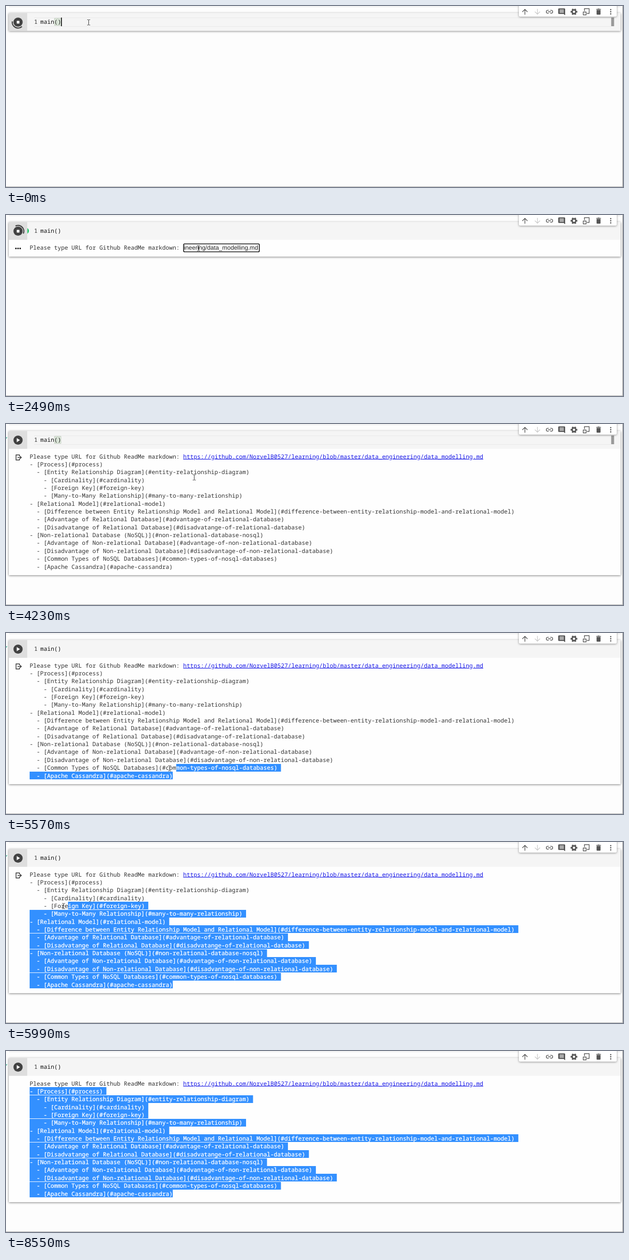
Recreate the animation shown at these times as an HTML page. Size 1280 px wide and 376 px high, loop 8700 ms.

```html
<!DOCTYPE html>
<html lang="en">
<head>
<meta charset="utf-8">
<title>Notebook cell</title>
<style>
  html, body { margin: 0; width: 100%; height: 100%; overflow: hidden; background: #fdfdfd; }
  svg { display: block; width: 1280px; height: 376px; }
  text { font: 12.07px "Noto Sans Mono", monospace; fill: #333; text-rendering: geometricPrecision; }
  .code { fill: #111; }
  .link { fill: #1a1ae6; text-decoration: underline; }
  .typed { font: 12.53px "Liberation Sans", Arial, sans-serif; fill: #222; text-anchor: end; }
  #picked text { fill: #fff; stroke: #fff; stroke-width: .3px; }
  #picked rect { fill: #3390ff; }
  .cell { fill: #fefefe; filter: drop-shadow(0 1.5px 2px rgba(0, 0, 0, .5)); }
  .bar { fill: #fff; filter: drop-shadow(0 1px 2px rgba(0, 0, 0, .4)); }
  .icons { fill: #555; }
  .line { fill: none; stroke: #555; stroke-width: 1.4px; }
</style>
</head>
<body>
<svg viewBox="0 0 1280 376">
  <rect x="6" width="1269" height="3" fill="#f4f4f4"/>
  <rect id="cell" class="cell" x="6" y="14.5" width="1269"/>
  <rect x="6" y="14.5" width="1269" height="37" fill="#f5f5f5"/>
  <rect x="6" y="14.5" width="38" height="37" fill="#dedede"/>

  <g id="editor">
    <path d="M58 24.5H1255M58 42.5H1255" stroke="#e9e9e9"/>
    <rect x="1255.5" y="24" width="6" height="18" fill="#999"/>
    <path d="M100.5 25.5H114V40.5H100.5ZM107.3 25.5V40.5" fill="#e1ecdf" stroke="#c3cdc1"/>
  </g>
  <text x="58.3" y="37.3">1</text>
  <text class="code" x="71" y="37.3">main()</text>
  <rect id="caret" x="114.3" y="24" width="1.6" height="18"/>

  <circle cx="25" cy="33.5" r="9.6" fill="#424242"/>
  <g id="stop">
    <rect x="22.3" y="30.8" width="5.6" height="5.6" rx=".6" fill="#fff"/>
    <path id="spin" d="M13.7 37.8A12 12 0 0 0 36.3 37.8" fill="none" stroke="#424242" stroke-width="2.4"/>
  </g>
  <path id="play" d="M22.3 29.3V37.7L29 33.5Z" fill="#fff"/>
  <path id="busy" d="M44.5 27Q50.5 33 44.5 39Z" fill="#0fbf5a"/>
  <path id="check" d="M0 30L2 27.5" stroke="#2fae8e" stroke-width="1.4"/>

  <path id="dots" d="M20.6 69.5h0M25 69.5h0M29.4 69.5h0" stroke="#222" stroke-width="3.4" stroke-linecap="round"/>
  <path id="out" d="M28 67V64.2H20.8V74.8H28V72M24 69.5H31.5M29 66.7L31.8 69.5 29 72.3" fill="none" stroke="#333" stroke-width="1.5"/>

  <text id="ask" x="49">Please type URL for Github ReadMe markdown:</text>
  <g id="field">
    <rect x="368.5" y="60" width="157" height="16.5" rx="2" fill="#fff" stroke="#111" stroke-width="1.7"/>
    <svg x="370" y="60" width="154" height="16"><text id="typed" class="typed" x="153" y="12">data_engineering/data_modelling.md</text></svg>
  </g>
  <text id="link" class="link" x="367.6" y="71.6">https://github.com/NorvelB0527/learning/blob/master/data_engineering/data_modelling.md</text>
  <g id="list"></g>
  <g id="picked"></g>

  <rect class="bar" x="1064" y="-4" width="203" height="26" rx="3"/>
  <g class="icons">
    <path class="line" d="M1076.5 18V7M1071.2 12.2L1076.5 7 1081.8 12.2"/>
    <path class="line" d="M1102.5 6V17M1097.2 11.8L1102.5 17 1107.8 11.8" style="stroke:#ccc"/>
    <path class="line" d="M1126 8.9H1124A3.1 3.1 0 0 0 1124 15.1H1126M1129 8.9H1131A3.1 3.1 0 0 1 1131 15.1H1129M1124.6 12H1130.4"/>
    <path d="M1147 5H1158.5Q1160 5 1160 6.5V19.5L1157 16.5H1147Q1145.6 16.5 1145.6 15V6.5Q1145.6 5 1147 5Z"/>
    <path d="M1148.5 8.2H1157.2M1148.5 10.7H1157.2M1148.5 13.2H1157.2" stroke="#fff" stroke-width="1.2"/>
    <circle class="line" cx="1178.3" cy="12" r="3.9" style="stroke-width:3px"/>
    <circle class="line" cx="1178.3" cy="12" r="6" pathLength="12" stroke-dasharray="1.1 .9" stroke-dashoffset=".55" style="stroke-width:2px"/>
    <path class="line" d="M1200 10.5V5.5H1209.7V15.5H1205M1197.5 12.5H1203.5V18.5H1197.5Z"/>
    <path d="M1225.2 8.3H1233.4V16.8Q1233.4 18 1232 18H1226.6Q1225.2 18 1225.2 16.8ZM1224.4 6.2H1227L1227.7 5.4H1231L1231.7 6.2H1234.3V7.6H1224.4Z"/>
    <path class="line" d="M1254.5 7.6h0M1254.5 12h0M1254.5 16.4h0" stroke-linecap="round" style="stroke-width:2.8px"/>
  </g>

  <rect x="1279" width="1" height="376" fill="#858585"/>
  <rect y="375" width="1280" height="1" fill="#a6a6a6"/>

  <g id="mouse">
    <path id="beam" d="M-2.5 -5.5H-.5L.5 -5 1.5 -5.5H3.5M.5 -5V5M-2.5 5.5H-.5L.5 5 1.5 5.5H3.5" fill="none" stroke="#333"/>
    <path id="arrow" d="M0 -6V4.5L2.4 2.4 4 6 5.6 5.3 4 1.9H7.2Z" fill="#fff" stroke="#444" stroke-width=".9"/>
    <path id="hand" d="M-2.5 1V-5Q-1.5 -7 -.4 -5V-1Q1 -2 1.8 -.6 3 -1.5 3.6 -.1 5 -.6 5.2 1V3.5Q5 5 4 6.5H-1.5Q-2.6 4.5 -4.8 1.8 -4.6 0 -2.5 1Z" fill="#fff" stroke="#444" stroke-width=".8"/>
  </g>
</svg>

<script>
const LOOP = 8700, STEP = 130;
const LEFT = 49, TOP = 59, ADV = 7.242, PITCH = 16.35;
const ASK = 490, PASTE = 1690, SEND = 3150, DONE = 3550, BLUR = 5160, SETTLE = 6800, FADE = 8400;

const $ = id => document.getElementById(id);
const show = (id, on) => { $(id).style.display = on ? '' : 'none'; };
const within = (t, a, b) => t >= a && t < b;

// heading depth and title; the anchor is derived from the title
const lines = [
  [0, 'Process'],
  [1, 'Entity Relationship Diagram'],
  [2, 'Cardinality'],
  [2, 'Foreign Key'],
  [2, 'Many-to-Many Relationship'],
  [0, 'Relational Model'],
  [1, 'Difference between Entity Relationship Model and Relational Model'],
  [1, 'Advantage of Relational Database'],
  [1, 'Disadvatange of Relational Database'],
  [0, 'Non-relational Database (NoSQL)'],
  [1, 'Advantage of Non-relational Database'],
  [1, 'Disadvantage of Non-relational Database'],
  [1, 'Common Types of NoSQL Databases'],
  [1, 'Apache Cassandra']
].map(([depth, title]) => {
  const anchor = title.toLowerCase().replace(/[()]/g, '').replace(/ /g, '-');
  return '  '.repeat(depth) + `- [${title}](#${anchor})`;
});

// pointer moves, each continuing from where the last one stopped
const moves = [
  { from: 200, to: 870, x: 397, y: 67 },
  { from: 870, to: 1180, x: 399, y: 69 },
  { from: SEND, to: 3290, x: 398, y: 75 },
  { from: 4090, to: 4900, x: 347, y: 301 },
  { from: 5290, to: 5570, x: 339, y: 281 },
  { from: 5570, to: 5990, x: 119, y: 133 },
  { from: 5990, to: 6590, x: 53, y: 86 },
  { from: 7490, to: 8290, x: 1218, y: 351 }
];

function pointer(t) {
  let x = 171, y = 34;
  for (const m of moves) {
    const k = Math.min(1, Math.max(0, (t - m.from) / (m.to - m.from)));
    x += (m.x - x) * k;
    y += (m.y - y) * k;
  }
  return [Math.round(x), Math.round(y)];
}

function refresh(time) {
  const base = Math.max(0, ...moves.map(m => m.from).filter(v => v <= time));
  return base + Math.floor((time - base) / STEP) * STEP;
}

function rowText(row, col = 0) {
  const s = lines[row - 1].slice(col), lead = s.length - s.trimStart().length;
  const x = LEFT + (col + lead) * ADV;
  return `<text x="${x}" y="${71.6 + row * PITCH}">${s.trimStart()}</text>`;
}

// from the pointer to the end of the list; it trails two columns until the drag settles
function selection(t) {
  if (t < 5290) return '';
  const [x, y] = pointer(Math.min(t, 7000));
  const first = Math.floor((y - TOP) / PITCH);
  const lag = t < SETTLE ? 2 : 0;
  let html = '';
  for (let row = first; row <= lines.length; row++) {
    const col = row === first ? Math.round((x - LEFT - ADV / 2) / ADV + lag) : 0;
    const end = lines[row - 1].length + (row < lines.length ? 1 : 0);
    if (col >= end) continue;
    html += `<rect x="${LEFT + col * ADV}" y="${Math.round(TOP + row * PITCH)}" width="${(end - col) * ADV}" height="16"/>`
      + rowText(row, col);
  }
  return html;
}

function draw(time) {
  const t = refresh(time);
  const asking = within(t, ASK, SEND), running = within(t, ASK, DONE), done = t >= DONE;
  const bottom = t < ASK ? 51.5 : asking ? 86.5 : done ? 314 : 84.5;
  $('cell').setAttribute('height', bottom - 14.5);
  $('ask').setAttribute('y', asking ? 72.4 : 71.6);

  show('editor', t < ASK || within(t, SEND, BLUR));
  show('caret', t < ASK || within(t, DONE, 4090) || within(t, 4600, BLUR));
  show('stop', !done);
  show('play', done);
  show('busy', running);
  show('check', done);
  show('dots', running);
  show('out', done && t < FADE + STEP);
  $('out').style.opacity = t > FADE ? .4 : 1;
  show('ask', t >= ASK);
  show('field', asking);
  show('typed', t >= PASTE);
  show('link', t >= SEND);
  show('list', done);
  $('spin').setAttribute('transform', `rotate(${28 + t * .377} 25 33.7)`);
  $('picked').innerHTML = selection(t);

  const shape = within(t, ASK, 1030) || t > 7800 ? 'arrow' : within(t, SEND, 4200) ? 'hand' : 'beam';
  for (const id of ['beam', 'arrow', 'hand']) show(id, id === shape);
  show('mouse', t < FADE - STEP / 2);
  $('mouse').setAttribute('transform', `translate(${pointer(t)})`);
}

$('list').innerHTML = lines.map((_, i) => rowText(i + 1)).join('');
const start = performance.now();
(function loop() {
  draw((performance.now() - start) % LOOP);
  requestAnimationFrame(loop);
})();
</script>
</body>
</html>
```
